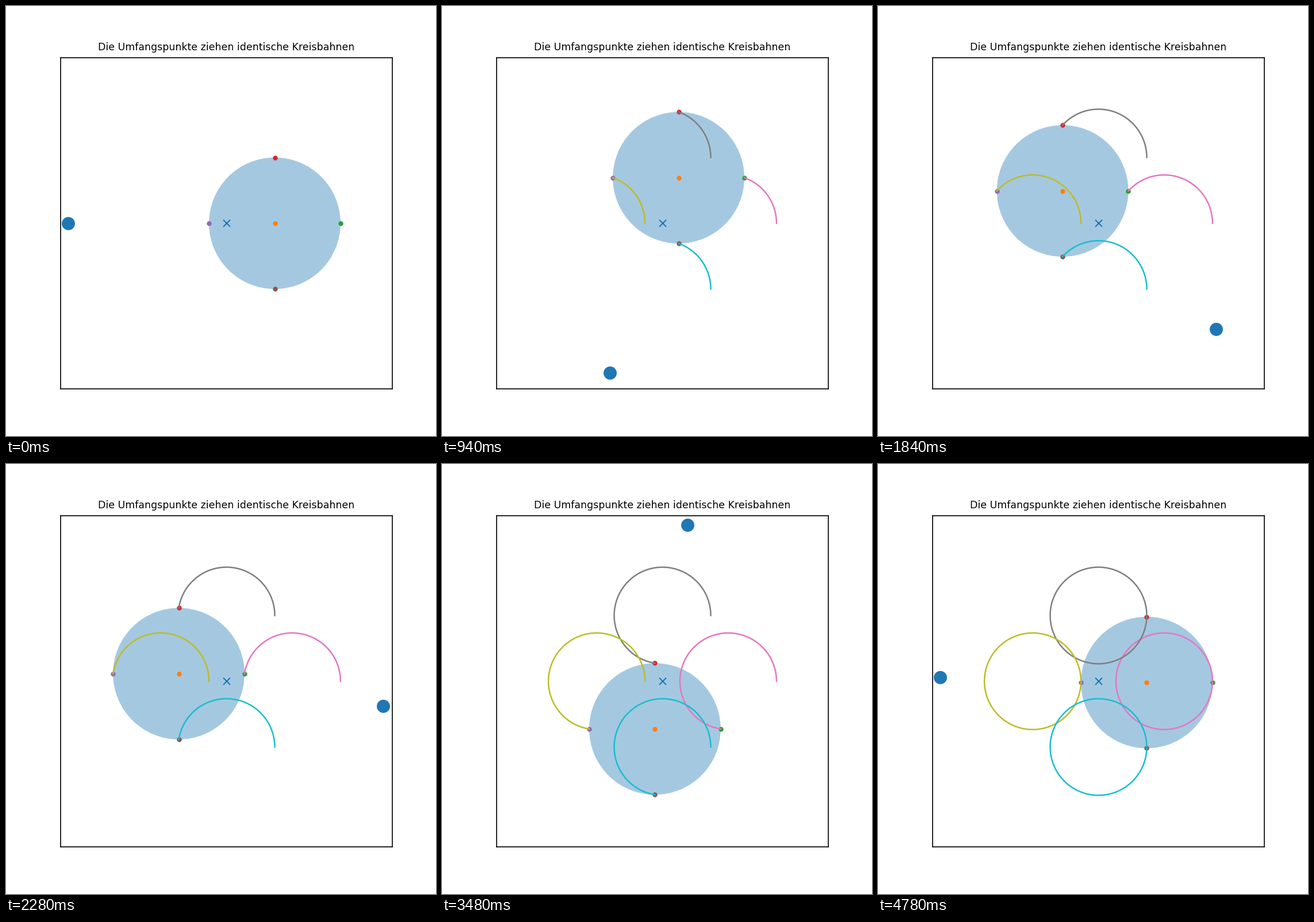
Recreate the animation shown at these times as a matplotlib script. Size 748x748 px, loop 4800 ms.

```python
import numpy as np
import matplotlib.pyplot as plt
from matplotlib.animation import FuncAnimation

SIZE = 748         # stage, in pixels
DPI = 150
FRAMES = 240
HALF = 288.1       # half the axes width, in pixels
ORBIT = 84.0       # disk centre around the pivot
RADIUS = 114.4     # disk radius
MOON = 275.5       # distance of the counterweight

plt.rcParams["font.family"] = "DejaVu Sans"

fig = plt.figure(figsize=(SIZE / DPI, SIZE / DPI), dpi=DPI)
ax = fig.add_axes([95.4 / SIZE, 82 / SIZE, 2 * HALF / SIZE, 2 * HALF / SIZE])
ax.set_xlim(-HALF, HALF)
ax.set_ylim(-HALF, HALF)
ax.set_xticks([])
ax.set_yticks([])
ax.set_title("Die Umfangspunkte ziehen identische Kreisbahnen",
             fontsize="small")

angles = 2 * np.pi * np.arange(FRAMES) / FRAMES
path = ORBIT * np.column_stack([np.cos(angles), np.sin(angles)])
rim = RADIUS * np.array([(1, 0), (0, 1), (-1, 0), (0, -1)])


def dot(color, size=3):
    return ax.plot([], [], "o", color=color, markersize=size)[0]


disk = ax.add_patch(plt.Circle((0, 0), RADIUS, color="C0", alpha=0.4, lw=0))
ax.plot(0, 0, "x", color="C0")
moon = dot("C0", 10)
hub = dot("C1")
rim_dots = [dot(f"C{k}") for k in range(2, 6)]
trails = [ax.plot([], [], color=f"C{k}", lw=1.2)[0] for k in range(6, 10)]


def draw(i):
    center = path[i]
    disk.center = tuple(center)
    hub.set_data([center[0]], [center[1]])
    x, y = -center * MOON / ORBIT
    moon.set_data([x], [y])
    for offset, point, trail in zip(rim, rim_dots, trails):
        track = path[:i + 1] + offset
        point.set_data(track[-1:, 0], track[-1:, 1])
        # a single point would leave a speck of line cap
        shown = track if i else track[:0]
        trail.set_data(shown[:, 0], shown[:, 1])
    return [disk, hub, moon, *rim_dots, *trails]


anim = FuncAnimation(fig, draw, frames=FRAMES, interval=20,
                     repeat=True, repeat_delay=0)
plt.show()
```
